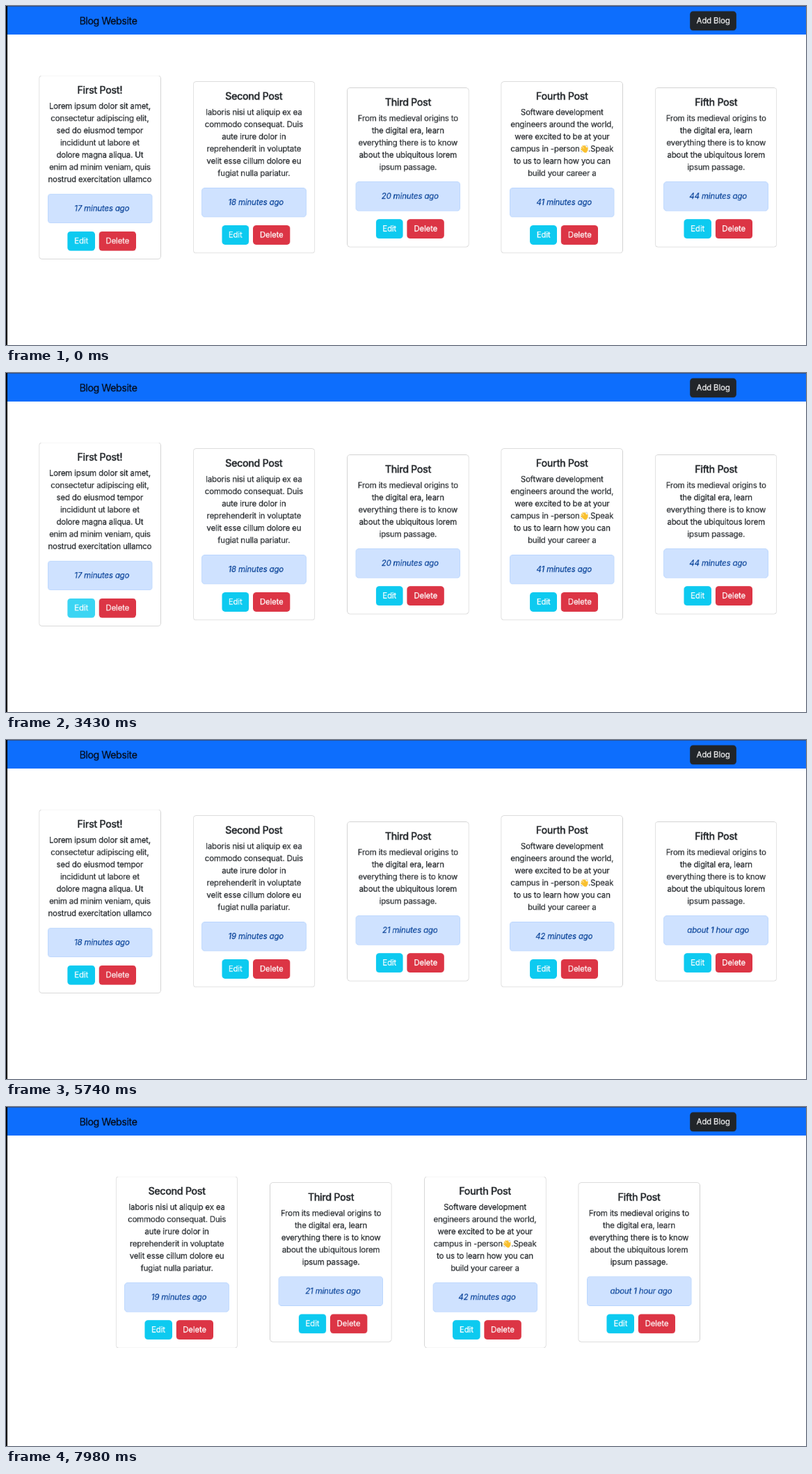
Animation, 1150 px wide and 487 px high, one loop 8000 ms. Source, as an HTML page:

```html
<!DOCTYPE html>
<html lang="en">
<head>
<meta charset="utf-8">
<title>Blog Website</title>
<style>
  * { box-sizing: border-box; }
  html, body { margin: 0; width: 100%; height: 100%; overflow: hidden; background: #fff; }
  #stage { position: relative; width: 1150px; height: 487px; overflow: hidden; background: #fff; }
  #edge-top, #edge-left { position: absolute; left: 0; top: 0; background: #000; }
  #edge-top { width: 100%; height: 1px; background: #2c4f8c; }
  #edge-left { width: 2px; height: 100%; }

  /* Laid out on whole CSS pixels, then scaled down as one picture */
  #page {
    position: absolute; left: 0; top: 0; width: 1582px; height: 667px;
    transform: translateY(1.65px) scale(.7305); transform-origin: 0 0; will-change: transform;
    font: 400 15.6px/24px Inter, "Liberation Sans", sans-serif;
    letter-spacing: -.011em; color: #212529; text-align: center; white-space: pre;
    -webkit-text-stroke: .25px;
  }
  nav { position: absolute; left: 0; top: -2px; width: 100%; height: 56px; background: #0d6efd; }
  .brand { position: absolute; left: 144.4px; top: 14px; line-height: 30px; font-size: 19.4px; letter-spacing: -.028em; color: #050a14; }
  .btn { display: block; height: 38px; line-height: 38px; border-radius: 6px; color: #fff; }
  .add { position: absolute; left: 1346px; top: 10px; width: 91.4px; background: #212529; }

  .scene { position: absolute; left: 0; top: 0; width: 100%; opacity: 0; }
  .list { top: 134px; display: flex; justify-content: center; align-items: center; gap: 63.2px; }
  .card { border: 1px solid rgba(0,0,0,.175); border-radius: 6px; background: #fff; }
  .post { flex: none; width: 240px; padding: 16px; }
  h5 {
    margin: 0 -10px 8px; font-size: 19.4px; line-height: 24px; font-weight: 500; letter-spacing: -.02em;
    -webkit-text-stroke: .4px;
  }
  p { margin: 0 -10px 16px; }
  .age {
    height: 58px; margin-bottom: 16px; padding: 16px 0 0 8px; border: 1px solid #b6d4fe; border-radius: 6px;
    background: #cfe2ff; color: #084298; font-style: italic;
  }
  .row { display: flex; justify-content: center; gap: 8px; padding-left: 8px; }
  .edit { width: 53.6px; background: #0dcaf0; }
  .delete { width: 73px; background: #dc3545; }
  .hand { width: 17px; height: 17px; vertical-align: -3px; }

  .form { position: absolute; left: 397px; top: 103px; width: 788px; height: 333px; }
  .head { height: 41px; padding-top: 8px; border-bottom: 1px solid rgba(0,0,0,.175); }
  .body { padding: 16px; }
  .label { height: 24px; margin-bottom: 8px; }
  .field { position: relative; height: 38px; margin-bottom: 16px; padding: 6px 12px; border: 1px solid #ced4da; border-radius: 6px; text-align: left; }
  .area { height: 86px; }
  .grip { position: absolute; right: 1px; bottom: 1px; width: 10px; height: 10px; }
  .update { width: 115.4px; margin: 0 auto; background: #ffc107; color: #000; }
</style>
</head>
<body>
<div id="stage">
  <div id="page">
    <nav><span class="brand">Blog Website</span><span class="btn add">Add Blog</span></nav>
  </div>
  <div id="edge-top"></div>
  <div id="edge-left"></div>
</div>
<script>
const LOOP = 8000;
const page = document.getElementById('page');

const hand = '<svg class="hand" viewBox="0 0 17 17" fill="none" stroke-linecap="round">' +
  '<path d="M4 5.500l5 6M6.500 3.200l5 6.500M9.800 3l3.500 6M3 9l5 4.500M15 6.500l-.5 5" stroke="#f9c02f" stroke-width="2.6"/>' +
  '<path d="M7 9l6-1 2 4-2.500 4-4-1z" fill="#f9c02f" stroke="#f9c02f"/>' +
  '<path d="M1.500 12q.8 2.600 3.400 3.200M12.500 1.400q2 .6 2.600 2.400" stroke="#8fa3b5"/></svg>';

const origins = 'From its medieval origins to\nthe digital era, learn\neverything there is to know\nabout the ubiquitous lorem\nipsum passage.';
const posts = [
  ['First Post!', 'Lorem ipsum dolor sit amet,\nconsectetur adipiscing elit,\nsed do eiusmod tempor\nincididunt ut labore et\ndolore magna aliqua. Ut\nenim ad minim veniam, quis\nnostrud exercitation ullamco'],
  ['Second Post', 'laboris nisi ut aliquip ex ea\ncommodo consequat. Duis\naute irure dolor in\nreprehenderit in voluptate\nvelit esse cillum dolore eu\nfugiat nulla pariatur.'],
  ['Third Post', origins],
  ['Fourth Post', `Software development\nengineers around the world,\nwere excited to be at your\ncampus in -person${hand}.Speak\nto us to learn how you can\nbuild your career a`],
  ['Fifth Post', origins]
];
const minutes = n => n + ' minutes ago';
const before = [17, 18, 20, 41, 44].map(minutes);
const after = [...[18, 19, 21, 42].map(minutes), 'about 1 hour ago'];

function scene(cls, html) {
  const el = document.createElement('div');
  el.className = 'scene ' + cls;
  el.innerHTML = html;
  page.append(el);
  return el;
}

function list(ages, first = 0) {
  return scene('list', posts.map(([title, text], i) =>
    `<div class="card post"><h5>${title}</h5><p>${text}</p><div class="age">${ages[i]}</div>` +
    '<div class="row"><span class="btn edit">Edit</span><span class="btn delete">Delete</span></div></div>'
  ).slice(first).join(''));
}

const early = list(before);
const form = scene('', '<div class="card form"><div class="head">Update a Blog</div><div class="body">' +
  '<div class="label">Title</div><div class="field">First Post!</div>' +
  '<div class="label">Content</div><div class="field area">' +
  'Lorem ipsum dolor sit amet, consectetur adipiscing elit, sed do eiusmod tempor incididunt ut labore\n' +
  'et dolore magna aliqua. Ut enim ad minim veniam, quis nostrud exercitation ullamco' +
  '<svg class="grip" viewBox="0 0 10 10"><path d="M1 9l8-8M5.500 9l3.500-3.500" stroke="#666" fill="none"/></svg></div>' +
  '<span class="btn update">Update Blog</span></div></div>');
const late = list(after);
const rest = list(after, 1);

function play(el, frames) {
  el.animate(frames, { duration: LOOP, iterations: Infinity }).startTime = 0;
}

// Hard cut: visible only between two times
function show(el, from, to) {
  const at = (time, opacity) => ({ offset: time / LOOP, opacity, easing: 'step-end' });
  play(el, [at(0, 0), at(from, 1), at(to, 0), at(LOOP, 0)]);
}

// Button colour: each change eases over 150 ms
function tint(el, base, changes) {
  const frames = [{ offset: 0, backgroundColor: base }];
  let colour = base;
  for (const [time, next] of changes) {
    frames.push({ offset: time / LOOP, backgroundColor: colour, easing: 'ease' },
                { offset: (time + 150) / LOOP, backgroundColor: next });
    colour = next;
  }
  frames.push({ offset: 1, backgroundColor: colour });
  play(el, frames);
}

show(early, 0, 3500);
show(form, 3500, 5740);
show(late, 5740, 7770);
show(rest, 7770, LOOP);

tint(early.querySelector('.edit'), '#0dcaf0', [[2510, '#31d2f2'], [3350, '#3dd5f3']]);
tint(form.querySelector('.update'), '#ffc107', [[4500, '#ffca2c'], [5520, '#ffcd39']]);
tint(late.querySelector('.delete'), '#dc3545', [[6360, '#bb2d3b'], [7410, '#b02a37']]);
</script>
</body>
</html>
```
